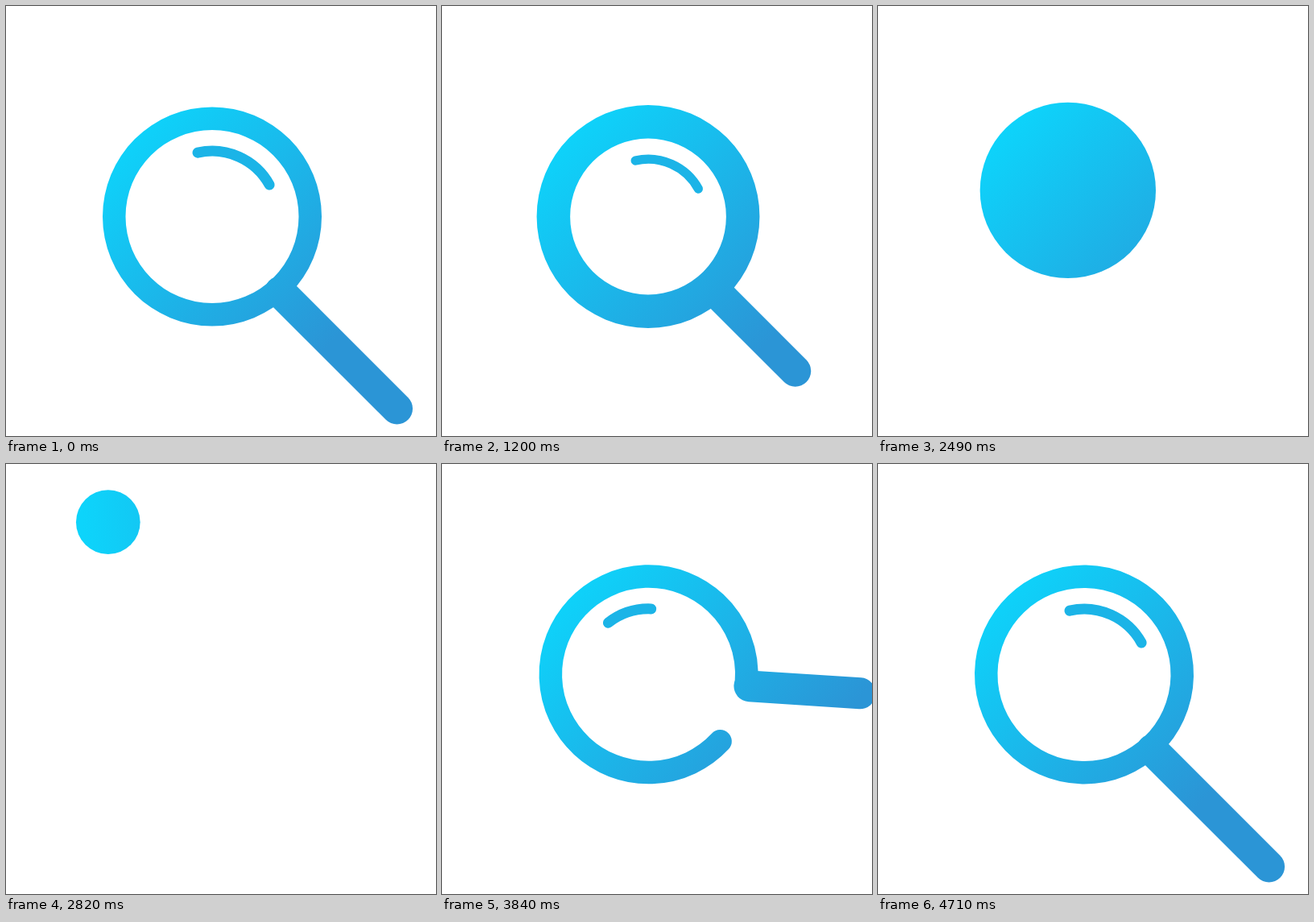
Animation, 534 px wide and 534 px high, one loop 4.74 s. Source, as an HTML page with a canvas:

```html
<!DOCTYPE html>
<html lang="en">
<head>
<meta charset="utf-8">
<title>Magnifier</title>
<style>
  html, body { margin: 0; width: 100%; height: 100%; overflow: hidden; background: #fff; }
  canvas { display: block; width: 100vw; height: 100vh; }
</style>
</head>
<body>
<canvas id="stage"></canvas>
<script>
const SIZE = 534, LOOP = 4740, STEP = 30;
const CX = 256, CY = 261.5;
const R = 121.75, RIM = 28.5;
const ROOT = 126, REACH = 331, GRIP = 39, OFFSET = 6.4;
const GLINT = { r: 81.4, from: -102.8, to: -29, width: 13 };
const LEAP = 2400, APEX = 2715, SWING = 3450;
const RAD = Math.PI / 180, TAU = Math.PI * 2;

const canvas = document.getElementById('stage');
const ctx = canvas.getContext('2d');
const ratio = window.devicePixelRatio || 1;
canvas.width = canvas.height = Math.round(SIZE * ratio);

const mix = (a, b, p) => a + (b - a) * p;
const span = (t, a, b) => Math.min(1, Math.max(0, (t - a) / (b - a)));
const easeInOut = (p, n) => p < 0.5 ? (2 * p) ** n / 2 : 1 - (2 - 2 * p) ** n / 2;
const easeOut = (p, n) => 1 - (1 - p) ** n;
const pullBack = p => p ** 4 * (3.05 * p - 2.05);

// Share of a damped swing that is still to go, from 1 down to 0.
function remaining(t) {
  const x = Math.max(0, t - SWING - 14) / 86;
  return (1 + x + x * x / 2) * Math.exp(-x);
}

// Gradient along the diagonal, turned with the shape.
function paint(turn = 0) {
  const c = Math.cos((45 + turn) * RAD), s = Math.sin((45 + turn) * RAD);
  const g = ctx.createLinearGradient(CX - 150 * c, CY - 150 * s, CX + 215 * c, CY + 215 * s);
  g.addColorStop(0, '#0dd4fb');
  g.addColorStop(1, '#2b95d6');
  ctx.fillStyle = ctx.strokeStyle = g;
}

function disc(x, y, r) {
  ctx.beginPath();
  ctx.arc(x, y, r, 0, TAU);
  ctx.fill();
}

function arc(x, y, r, from, to, width) {
  if (r <= 0 || width <= 0) return;
  ctx.lineWidth = width;
  ctx.beginPath();
  ctx.arc(x, y, r, from * RAD, to * RAD);
  ctx.stroke();
}

// The handle runs beside the radius, not on it.
function handle(x, y, angle, reach, width) {
  const c = Math.cos(angle * RAD), s = Math.sin(angle * RAD);
  const point = d => [x + d * c - OFFSET * s, y + d * s + OFFSET * c];
  ctx.lineWidth = width;
  ctx.beginPath();
  ctx.moveTo(...point(ROOT));
  ctx.lineTo(...point(reach));
  ctx.stroke();
}

function glint(x, y, from, to, scale, width) {
  ctx.strokeStyle = '#1bb4e7';
  arc(x, y, GLINT.r * scale, from, to, width);
}

// The handle is pulled in while the lens swells and fills up.
function fillLens(t) {
  const q = easeInOut(span(t, 960, 1740), 4);
  const outer = mix(136, 121.5, q) + 15.5 * Math.sin(Math.PI * q);
  const hole = 107.5 * (1 - easeInOut(span(t, 960, 1680), 4));
  const pull = span(t, 570, 1300);
  const scale = 1 - easeInOut(span(t, 960, 1640), 4);
  paint();
  ctx.beginPath();
  ctx.arc(CX + 0.3 * q, CY, outer, 0, TAU);
  if (hole > 0.2) {
    ctx.moveTo(CX + hole, CY);
    ctx.arc(CX, CY, hole, 0, TAU);
  }
  ctx.fill('evenodd');
  if (pull < 1) handle(CX, CY, 45, mix(REACH, ROOT, pullBack(pull)), GRIP);
  glint(CX, CY, GLINT.from, GLINT.to, scale, GLINT.width * scale);
}

function leap(t) {
  const p = easeInOut(span(t, LEAP, APEX), 2);
  paint();
  disc(mix(CX + 0.3, 131, p), mix(CY, 62, p), mix(121.5, 46, p));
}

// Degrees along the bowl; below zero the path is the drop above its left rim.
function bowlPoint(u) {
  const x = CX + 3, y = CY - 1.2;
  if (u < 0) return [x - R - 15 * (u / 72) ** 2, y + u * 2.12];
  return [x - R * Math.cos(u * RAD), y + R * Math.sin(u * RAD)];
}

function fall(t) {
  const p = span(t, APEX, SWING), land = 2940;
  const r = mix(46, RIM / 2, easeOut(p, 1.4));
  const head = mix(-94, 185, p ** 2.1);
  paint(-48);
  if (t <= land) {
    disc(mix(131, 122, span(t, APEX, land)), CY + head * 2.12, r);
    return;
  }
  const tail = mix(-71, -7, easeInOut(span(t, land, SWING), 2));
  ctx.lineWidth = r * 2;
  ctx.beginPath();
  for (let i = 0; i <= 80; i++) ctx.lineTo(...bowlPoint(mix(tail, head, i / 80)));
  ctx.stroke();
}

// The bowl swings round into a rim and throws the handle out.
function closeRim(t) {
  const e = remaining(t);
  const x = CX + 3 * e, y = CY - 1.2 * e;
  const from = 46 - 51 * e ** 1.7, to = 406 - 219 * e;
  const k = Math.min(1, 2 * e) ** 1.14;
  paint(from - 46);
  arc(x, y, R, from, Math.min(to, from + 360), RIM);
  if (k < 1) handle(x, y, to - 361, mix(REACH, ROOT, k), mix(GRIP, RIM, k ** 4));
  const start = GLINT.from - 134 * e, end = GLINT.to - 312 * e;
  if (end > start) glint(x, y, start, end, 1, Math.min(GLINT.width, (end - start) / 2));
}

function draw(t) {
  ctx.setTransform(canvas.width / SIZE, 0, 0, canvas.height / SIZE, 0, 0);
  ctx.clearRect(0, 0, SIZE, SIZE);
  ctx.lineCap = ctx.lineJoin = 'round';
  if (t < LEAP) fillLens(t);
  else if (t < APEX) leap(t);
  else if (t < SWING) fall(t);
  else closeRim(t);
}

const begin = performance.now();
function tick() {
  const t = (performance.now() - begin) % LOOP;
  draw(Math.floor(t / STEP) * STEP);
  requestAnimationFrame(tick);
}
tick();
</script>
</body>
</html>
```
